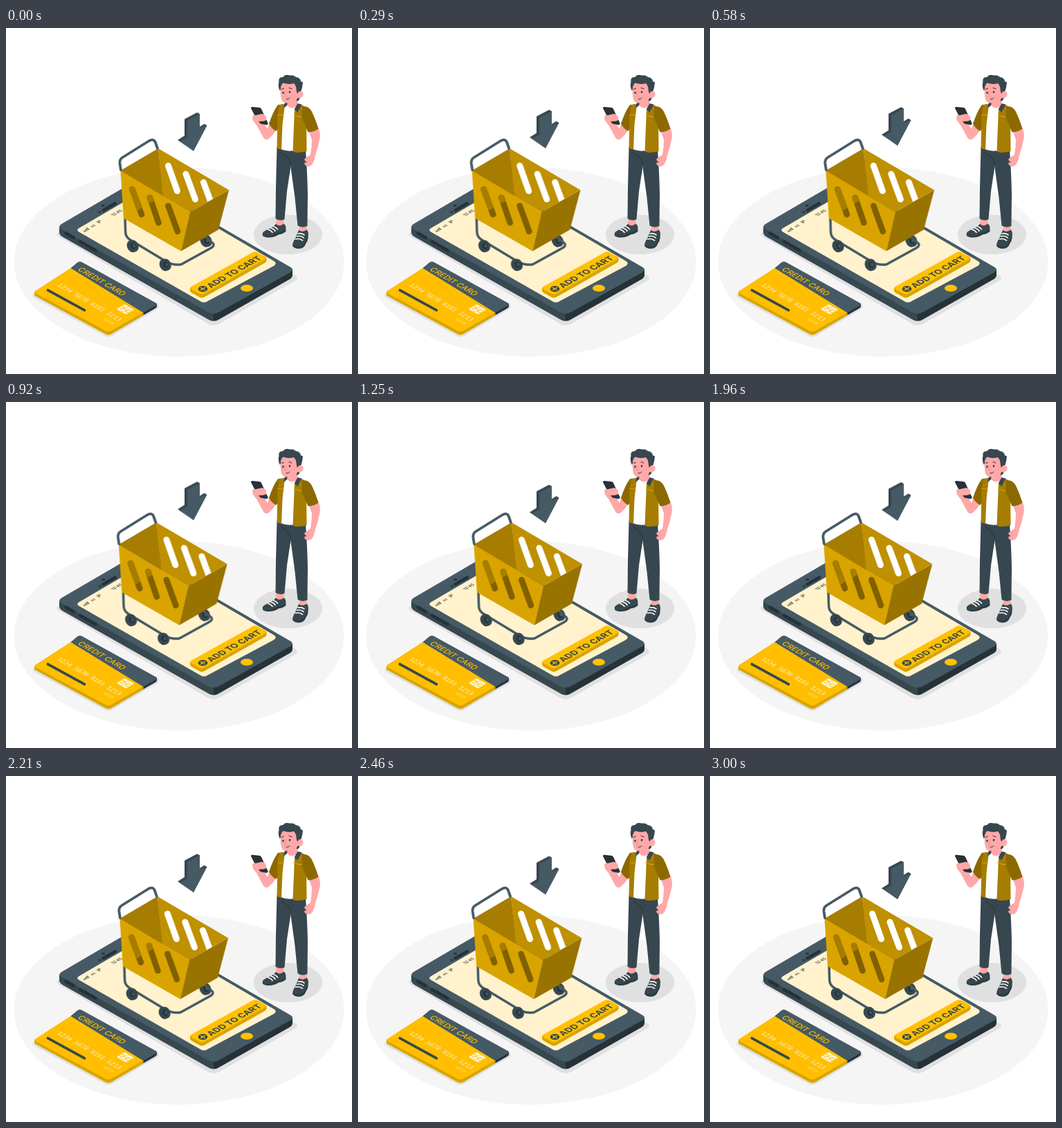
Recreate the animation shown at these times as an HTML page. Size 500 by 500 pixels, loop 3.04 s.

```html
<!DOCTYPE html>
<html lang="en">
<head>
<meta charset="utf-8">
<title>Add to cart</title>
<style>
  html, body { margin: 0; width: 100%; height: 100%; overflow: hidden; background: #fff; }
  svg { display: block; width: 100%; height: 100%; }

  .ink { fill: #263238; }
  .dark { fill: #37474f; }
  .slate { fill: #455a64; }
  .gold { fill: #ffc105; }
  .amber { fill: #ffbf00; }
  .ochre { fill: #d9a400; }
  .olive { fill: #a67d00; }
  .skin { fill: #ffa8a7; }
  .grey { fill: #e0e0e0; }
  .line { fill: none; stroke-linecap: round; stroke-linejoin: round; }
  .label { font-family: Inter, "Liberation Sans", sans-serif; }
  .mono { font-family: "DejaVu Sans Mono", "Liberation Mono", monospace; }

  /* 3 s of motion, then the rest pose is held for 40 ms */
  .cart { animation: shake 3040ms linear -30ms infinite; }
  .arrow { animation: float 3040ms linear -30ms infinite; }

  @keyframes shake {
    0%, 98.684%, 100% { transform: translateX(0); }
    9.868%, 88.816% { transform: translateX(-1px); }
    19.737%, 78.947% { transform: translateX(2px); }
    29.605%, 49.342%, 69.079% { transform: translateX(-4px); }
    39.474%, 59.21% { transform: translateX(4px); }
  }
  @keyframes float {
    0%, 49.342%, 98.684%, 100% { transform: translateY(0); }
    24.671%, 74.013% { transform: translateY(-10px); }
  }
</style>
</head>
<body>
<svg viewBox="0 0 500 500">
  <defs>
    <g id="wheel">
      <ellipse class="dark" cx="1.5" cy=".6" rx="6.800" ry="8.800" transform="rotate(-24)"/>
      <ellipse class="dark" cx="-1.2" cy="0" rx="6.800" ry="9" transform="rotate(-24)"/>
      <ellipse class="ink" cx="1" cy=".6" rx="3.3" ry="4.4" transform="rotate(-24)"/>
      <ellipse class="slate" cx="2" cy=".8" rx="1.8" ry="2.6" transform="rotate(-24)"/>
    </g>
    <path id="slots" d="M182.500 233 L196 269.500 M208 245 L220.500 281.500 M234.500 257 L248 294"/>
    <clipPath id="innerWall"><path d="M160 200 H240 V235 L170 275 Z"/></clipPath>
    <clipPath id="mouth"><path d="M165.500 206 L220 174 L322 234 L266 266 Z"/></clipPath>
  </defs>

  <!-- floor -->
  <ellipse cx="250" cy="338" rx="238.500" ry="137" fill="#f5f5f5"/>
  <ellipse class="grey" cx="407.500" cy="298.500" rx="49.500" ry="28.700"/>
  <path class="grey" d="M77 294 Q70 298 77 302 L291 427 Q300 432 309 427 L418 365 Q424 361 418 357 L300 300 Z"/>
  <path class="grey" d="M41 384 Q36 387 41 390 L143 445 Q148 447.500 153 445 L219 406 Q223 403 219 399 Z"/>

  <!-- phone -->
  <path class="dark" d="M77 287 V295 Q77 299 82 302 L292 421 Q296 423.500 300 423.500 L312 400 Z"/>
  <path class="ink" d="M300 412 V423.500 Q304 423.500 308 421 L410 363 Q414 360.500 414 357 V349 Z"/>
  <path class="slate" d="M80.500 283 Q74 287 80.500 291 L292 410.500 Q300 415 308 410.500 L411 353 Q417 349 411 345.500 L197 222 Q191 219 185 222 Z"/>
  <path class="line" d="M86.500 296.500 L98 303 M107 308.500 L129.500 321.300" stroke="#263238" stroke-width="4.500"/>
  <path fill="#fff2cc" d="M105 289.500 Q101.500 292 105 294.500 L281 395 Q286 398 291 395 L387.500 343.500 Q392 340 387.500 337 L222 240 L188 241 Z"/>
  <path class="line" d="M140.500 263.500 L158 253.500" stroke="#263238" stroke-width="4.400"/>
  <ellipse class="ink" cx="135.500" cy="266" rx="2" ry="1.600"/>
  <ellipse class="ink" cx="140.500" cy="256.500" rx="2.500" ry="1.600"/>
  <ellipse class="gold" cx="348" cy="376" rx="9" ry="5"/>

  <!-- status bar -->
  <path class="line" d="M112.500 293.800 l1 .7 M114 292.300 l1.700 1.200 M115.300 290.700 l2.400 1.700 M116.600 289 l3.200 2.300" stroke="#37474f" stroke-width="1.100"/>
  <g class="label dark" font-weight="600">
    <text font-size="4.500" transform="matrix(.866 -.5 .866 .5 124.500 288.500)">4G</text>
    <text font-size="6" transform="matrix(.866 -.5 .866 .5 155 272)">12:45</text>
  </g>
  <path class="line" d="M131 280.300 Q132.800 278.200 136 278.500 M132.700 281 Q134 279.900 135.800 280.100" stroke="#37474f" stroke-width=".9"/>
  <ellipse class="dark" cx="134.800" cy="281.600" rx="1" ry=".7"/>

  <!-- add button -->
  <path class="ochre" d="M266 375.500 V379.500 Q266 381.300 268.500 382.700 L280 389.200 Q283 390.800 286 389.200 L374 339.500 Q376.500 338 376.500 336 V332 Z"/>
  <path class="gold" d="M268 373.500 Q264.500 375.500 268 377.700 L280 384.300 Q283 385.800 286 384.300 L374.500 334 Q378 332 374.500 330 L363 324 Q360 322.500 357 324 Z"/>
  <ellipse class="dark" cx="284.500" cy="377" rx="6.800" ry="4.300"/>
  <path class="line" d="M281.700 378.600 L287.300 375.400 M281.700 375.400 L287.300 378.600" stroke="#ffc105" stroke-width="1.500"/>
  <text class="label dark" font-size="12.500" font-weight="700" transform="matrix(.866 -.5 .866 .5 296.500 376)">ADD TO CART</text>

  <!-- credit card -->
  <path class="ochre" d="M41 381 V385 Q41 386.500 43 387.500 L144 442.500 Q148 444.500 152 442.500 L199 415 V405 Z"/>
  <path class="ink" d="M198.500 410 V415 L216 405 Q218 403.500 218 402 V398 Z"/>
  <path class="amber" d="M43 379.500 Q39.500 381.500 43 383.500 L144 437.500 Q148 439.500 152 437.500 L198.500 411 L94 346.500 Z"/>
  <path class="slate" d="M93.500 347 L103 339 Q106 336.300 109.500 338.300 L216 397 Q220 399.200 216 401.500 L198.500 411.500 Z"/>
  <text class="label amber" font-size="11.300" font-weight="500" transform="matrix(.866 .5 -.866 .5 102.500 349.500)">CREDIT CARD</text>
  <g class="mono" fill="#fff2cc">
    <text font-size="9.100" transform="matrix(.866 .5 -.866 .5 73 372)">1234 5678 9101 1213</text>
    <text font-size="5" transform="matrix(.866 .5 -.866 .5 140.500 421)">12/25</text>
  </g>
  <path class="line" d="M60.500 378.800 L113.500 407.800" stroke="#37474f" stroke-width="3.800"/>
  <g transform="matrix(.866 .5 -.866 .5 171.500 399)">
    <rect width="16" height="14" rx="2" fill="#fff2cc"/>
    <path class="line" d="M0 5 H5.500 V9.500 H0 M16 5 H10.500 V9.500 H16 M5.500 5 L8 0 M10.500 9.500 L8 14 M5.500 7 H10.500" stroke="#ffbf00" stroke-width="1"/>
  </g>

  <!-- cart -->
  <g class="cart">
    <use href="#wheel" x="289" y="307.500"/>
    <path class="line" d="M172 272 L172.700 295 Q173 301.500 178.500 305.500 L229 336 Q242 344 253.500 341.500 L297 317.500 Q302 314 299 311 L287 301" stroke="#455a64" stroke-width="3.500"/>
    <use href="#wheel" x="183" y="315"/>
    <use href="#wheel" x="230" y="342"/>
    <path class="olive" d="M165.500 206 L220 174 L228 243 L200 240 Z"/>
    <path d="M220 174 L322 234 L266 266 L227 243 Z" fill="#bf9000"/>
    <path class="line" clip-path="url(#mouth)" d="M234.500 199 L247.500 235.500 M260 211 L273.500 247.500 M285.500 223 L299 259.500" stroke="#fff" stroke-width="9"/>
    <path class="ochre" d="M165.500 206 L266 266 L253 322.500 L170 275 Z"/>
    <path d="M266 266 L322.300 234 L307 291.500 L253 322.500 Z" fill="#997300"/>
    <use class="line" href="#slots" stroke="#806000" stroke-width="8.600"/>
    <use class="line" href="#slots" stroke="#a67d00" stroke-width="8.600" clip-path="url(#innerWall)"/>
    <path class="line" d="M166 205 L164.500 195.500 Q164 190 168.500 187 L207 163 Q213.500 159.500 215.800 165 L219 174" stroke="#455a64" stroke-width="3.800"/>
  </g>

  <!-- arrow -->
  <g class="arrow">
    <path class="dark" d="M258 132 L276 122.500 L280 124.600 L280 143 L286.500 139 L290.500 141 L271 178 L248 162.200 L258 156 Z"/>
    <path class="slate" d="M262 134 L280 124.600 V145 L290.500 141 L271 178 L251.500 164 L262 158 Z"/>
  </g>

  <!-- legs and shoes -->
  <path class="skin" d="M390.500 274 H402 L401 288 Q395 292 390 287 Z M424 284 H435 L434 296 Q429 300 423.500 295 Z"/>
  <path class="dark" d="M390 283 Q395 288 401 283 Q405 283 404.500 294 Q400 298 394 298.500 Q386 304 376 302.500 Q369 301 371 296 Q373 293 379 291 Q387 287 390 283 Z"/>
  <path class="dark" d="M423 292 Q429 296 434.500 291.500 Q438 294 436.500 304 Q436 308 433.500 311 Q431 319 423 319 Q414 318.500 414 313 Q415 308 418 304 Q421 297 423 292 Z"/>
  <path class="line" d="M371.500 300 Q381 303.500 390 298 Q397 296.500 403.500 293 M414.800 315 Q424 320.500 431.500 312.500 Q434 309 435.500 304" stroke="#263238" stroke-width="1.200"/>
  <path class="line" d="M379 291.500 Q383 292 385 295.500 M383 289.300 Q387 290 389 293.500 M386.500 286.800 Q390.500 288 392.500 291 M418.500 305 Q424 303.500 428.500 307 M420.500 301 Q425.500 299.500 430 303 M422 297.300 Q427 296 431 299" stroke="#fff" stroke-width="1.600"/>
  <path class="dark" d="M391.500 172 L414 175 L411.500 200 L406 236 L402.500 276.500 Q396 279.500 389.500 275.500 L390 230 Z"/>
  <path class="dark" d="M409 174 L433 176 Q435.500 210 436 240 L435.500 286 Q428 289.500 421.500 285.500 L417.500 245 L411 198 Z"/>
  <path class="line" d="M398 181 Q408 186 410 192 L411.500 198" stroke="#263238" stroke-width="1"/>

  <!-- far arm -->
  <path class="skin" d="M381 136 L391 147 Q386 155 379 160.500 Q375 163 371.500 157.500 L362 140 L372 136 L378 146 Z"/>

  <!-- torso -->
  <path class="skin" d="M407 102 H422 L421 117 L411 121 L405 114 Z"/>
  <path fill="#fff" d="M401 111 L407 112 Q411 118 418 114 L417 177 Q406 179 397 175 Z"/>
  <path d="M393 111 L403 110 L392.500 146 L390.500 149 Q384 146 380 138.500 Q386 120 393 111 Z" fill="#8c6900"/>
  <path class="olive" d="M395 111 L403 110 L399.500 140 L398 176 L391.500 174 L392.500 125 Z"/>
  <path class="olive" d="M417 117 L427 111 Q433 112 434 124 L434.500 178 Q424 181.500 414.500 179 Z"/>
  <path class="line" d="M393 125.500 L400.500 125.500 M416 126 L427 128.300" stroke="#d9a400" stroke-width="1.200"/>
  <path class="dark" d="M402.500 109 L407 106 L406 112 L401 116 Z M417 117 L421.500 109 L427.500 110.500 L421 122 Z"/>

  <!-- near arm -->
  <path class="skin" d="M437 147 L451 143 Q455 151 453.500 160 Q451 172 447 184 Q445 195 441 198.500 Q436 201.500 432 198 L431 195 L436 193.500 Q430 192 431.500 189 L440 183 Q442 172 442 161 Z"/>
  <path d="M428 113 Q437 112 441.500 120 Q447 131 451.500 145.500 Q445 150.500 436.500 150.500 L427.500 130 Z" fill="#8c6900"/>
  <path class="line" d="M432 195 L437 193.500 M433.500 189.500 L438 187" stroke="#f28f8f" stroke-width=".8"/>

  <!-- handset -->
  <path class="ink" d="M354 116 Q353.500 114 356 114 L366 115 Q368 115.200 369 117 L378.500 137.500 Q379 140 376.500 139.500 L367 138 Q365 137.500 364 135.500 Z"/>
  <path class="skin" d="M356 128 Q357 125 361 126 L370 124 Q375 125 376 129 L376 133 Q371 137 366 135 L374 140 L370 148 L361 139 Q356 134 356 128 Z"/>
  <path class="ink" d="M365 135 L374 134.500 L378.500 138 L377 140 L368 138.500 Z"/>

  <!-- head -->
  <path class="dark" d="M415 82 H428 L425 98 L424 103 Q422 106.500 419.500 105 Z"/>
  <path class="skin" d="M397 82 Q405 76 420 79 L422 92 Q423.500 89.500 426.500 91.500 Q431 94 429 98 Q427 102 421.500 101 Q419 108 409.500 108.500 Q401 109 398.500 104.500 Q395.500 95 397 82 Z"/>
  <path class="dark" d="M395.500 90.500 Q392.500 83 394.500 78 Q393 71 400 71 Q404 66 410 68.500 Q416 67.500 419 71 Q425 71.500 426 77 L429 78.500 Q428.500 86 426.500 91 L423 92 L421 95 L419.500 90 Q420 84 416 80 Q408 82 401 79.500 Q396.500 82 397 89 Z"/>
  <ellipse class="ink" cx="400.500" cy="93.500" rx="1.200" ry="1.500"/>
  <ellipse class="ink" cx="410" cy="92.500" rx="1.200" ry="1.500"/>
  <path class="line" d="M398.500 88.500 L401.500 87.300 M409 86.500 L413 88" stroke="#37474f" stroke-width="1.100"/>
  <path class="line" d="M404.500 92 L402.500 98.500 L405 98.800" stroke="#f28f8f" stroke-width="1"/>
  <path class="line" d="M405 103 Q408.500 103 410 101" stroke="#263238" stroke-width=".9"/>
</svg>
</body>
</html>
```
